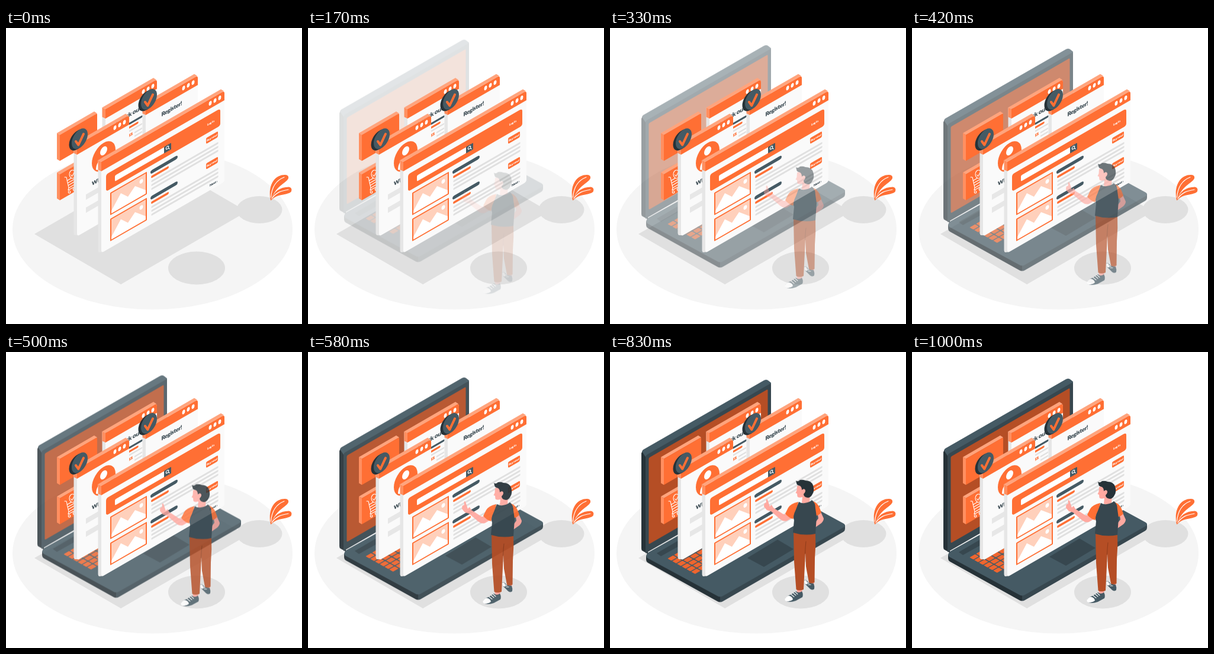
These frames come from a looping animation (500x500 px, 1040 ms). An HTML page without scripts:

```html
<!DOCTYPE html>
<html lang="en">
<head>
<meta charset="utf-8">
<title>Online shop</title>
<style>
html, body { margin: 0; width: 100%; height: 100%; overflow: hidden; background: #fff; }
svg { display: block; width: 100vw; height: 100vh; }
text { font-family: Lato, "Open Sans", sans-serif; font-weight: 900; letter-spacing: -.04em; fill: #37474f; }
.main { fill: #ff6f34; }
.light { fill: #ffa47d; }
.edge { fill: #ff8f60; }
.page { fill: #fafafa; }
.side { fill: #e6e6e6; }
.slate { fill: #455a64; }
.dark { fill: #37474f; }
.night { fill: #263238; }
.brown { fill: #b54e25; }
.skin { fill: #ffa9a0; }
.shade { fill: #e0e0e0; }
.white { fill: #fff; }
.line { fill: none; stroke-linecap: round; stroke-linejoin: round; }
.s-dark { stroke: #455a64; }
.s-main { stroke: #ff6f34; }
.s-grey { stroke: #e0e0e0; }
.s-white { stroke: #fff; }
.drop, .rise { animation: enter 1040ms infinite; }
.drop { --from: -30px; }
.rise { --from: 30px; }
@keyframes enter {
  0% { opacity: 0; transform: translateY(var(--from)); animation-timing-function: cubic-bezier(.345, .089, .5, 1.367); }
  92.3%, 100% { opacity: 1; transform: translateY(0); }
}
</style>
</head>
<body>
<svg viewBox="0 0 500 500">
  <defs>
    <g id="dots" class="white">
      <ellipse cx="-16" cy="7.3" rx="2.5" ry="3.6"/>
      <ellipse cx="-8" cy="7.3" rx="2.5" ry="3.6"/>
      <ellipse cy="7.3" rx="2.5" ry="3.6"/>
    </g>
    <g id="badge">
      <ellipse class="line" rx="13.5" ry="15.6" transform="matrix(1 -.577 0 1 -2 1.2)" style="fill:#263238"/>
      <ellipse class="night" rx="13.5" ry="15.6" transform="matrix(1 -.577 0 1 -4.5 2.5)"/>
      <ellipse class="slate" rx="13.5" ry="15.6" transform="matrix(1 -.577 0 1 0 0)"/>
      <path class="line s-main" stroke-width="4" d="M-6.5 4.5L-2.2 10.5L6.5 -8"/>
    </g>
    <g id="photo">
      <rect width="60" height="36" fill="#ffd0bb"/>
      <path class="white" d="M0 32L17 10L29 23L41 12L60 30V36H0z"/>
      <ellipse class="white" cx="51.5" cy="10" rx="3" ry="3.5"/>
      <rect class="line s-main" width="60" height="36" stroke-width="2"/>
    </g>
    <g id="entry" class="line">
      <path class="s-dark" stroke-width="6" d="M86 66h40"/>
      <path class="s-main" stroke-width="4" d="M86 74.5h26"/>
      <path class="s-grey" stroke-width="3.4" d="M86 82h110M86 88.5h110M86 95h110"/>
    </g>
    <g id="buy">
      <rect class="main" width="20" height="10" rx="2"/>
      <text x="10" y="6.8" font-size="4.6" text-anchor="middle" style="fill:#fff">Buy now!</text>
    </g>
    <g id="panel">
      <path class="light" d="M-5 -6H58L63 0H0z"/>
      <path class="edge" d="M0 0L-5 -6V38L0 44z"/>
      <path class="main" d="M0 0H61q2 0 2 2V42q0 2-2 2H0z"/>
    </g>
    <pattern id="keys" width="11" height="8" patternUnits="userSpaceOnUse">
      <rect width="9.4" height="6.6" rx="1" fill="#f0652e"/>
    </pattern>
  </defs>

  <ellipse cx="247.5" cy="340" rx="236.5" ry="135.5" fill="#f5f5f5"/>
  <g class="shade">
    <path d="M48 348L194 433L407 310L261 225z"/>
    <ellipse cx="322" cy="405.5" rx="48" ry="28"/>
    <ellipse cx="428" cy="307" rx="38.5" ry="23"/>
  </g>

  <!-- laptop -->
  <g class="drop">
    <path class="night" d="M61 342V349q0 3 3 5L181 419q2.500 1.500 5 1.500V400z"/>
    <path class="dark" d="M186 400V420.500q2.500 0 5-1.500L394 302q3-2 3-5V290z"/>
    <path class="slate" d="M64 337L272 221L395 288q4 3 0 6L191 410q-5 3-10 0L63 346q-4-4 1-9z"/>
    <path class="dark" d="M79 338L120 314V324L86 343z"/>
    <path class="dark" d="M232 346L283 315L310 331L260 361z"/>
    <rect width="148" height="47" fill="url(#keys)" transform="matrix(1 -.577 1 .56 97 347)"/>
    <path class="night" d="M53 169L56 163L64 172V339L55 334q-2-1-2-4z"/>
    <path class="slate" d="M54 166q1-2 3-3.500L260 46q4-2 7 0L272 50V56L61 177z"/>
    <g transform="matrix(1 -.577 0 1 60 173)">
      <path class="dark" d="M3 0H209q3 0 3 3V161q0 4-4 4H0V4q0-4 3-4z"/>
      <rect class="brown" x="5.500" y="7" width="201" height="146" rx="2"/>
    </g>
  </g>

  <!-- floating panels -->
  <use href="#panel" transform="matrix(1 -.577 0 1 91 180.500)"/>
  <use href="#panel" transform="matrix(1 -.577 0 1 91 247)"/>
  <g class="line s-white" stroke-width="1.1">
    <path d="M99 252L102 252L106 270L118 263M103 258L118 249M104 262L118 254M105 266L118 258M106 270L105 274L118 267"/>
    <ellipse cx="112.500" cy="247" rx="5.500" ry="7" style="fill:#ff6f34"/>
    <path d="M109.500 248L111.500 250.500L115.500 243.500"/>
    <ellipse cx="107" cy="277" rx="1.800" ry="2"/>
    <ellipse cx="115" cy="272.500" rx="1.800" ry="2"/>
  </g>

  <!-- check out -->
  <g transform="matrix(1 -.577 0 1 168 137)">
    <path class="side" d="M0 0L-5.500 -6V89L0 95z"/>
    <path class="edge" d="M0 0L-5.500 -6V10L0 16z"/>
    <path class="light" d="M-5.500 -6H81L86 0H0z"/>
    <rect class="page" width="87" height="95" rx="4"/>
    <path class="main" d="M0 0H83q4 0 4 4V16H0z"/>
    <use href="#dots" x="80"/>
    <text x="60" y="36" font-size="10" text-anchor="end">Check out</text>
    <g class="line" stroke-width="3.500">
      <path class="s-dark" d="M20 48H61"/>
      <path class="s-main" d="M20 54.500H54"/>
      <path class="s-grey" stroke-width="2.500" d="M20 60.500H61M50 68H61M50 74H61"/>
    </g>
    <text x="46" y="70" font-size="9" text-anchor="end" style="fill:#ff6f34">Address</text>
  </g>

  <!-- register -->
  <g transform="matrix(1 -.577 0 1 236 131)">
    <path class="side" d="M0 0L-5.500 -6V89L0 95z"/>
    <path class="edge" d="M0 0L-5.500 -6V10L0 16z"/>
    <path class="light" d="M-5.500 -6H82L87 0H0z"/>
    <rect class="page" width="88" height="95" rx="4"/>
    <path class="main" d="M0 0H84q4 0 4 4V16H0z"/>
    <use href="#dots" x="80"/>
    <text x="26.500" y="34" font-size="9.500">Register!</text>
  </g>
  <use href="#badge" x="241.500" y="120.500"/>

  <!-- welcome -->
  <g transform="matrix(1 -.577 0 1 120 198)">
    <path class="side" d="M2 2L-5.500 -6V145q0 3 2 5L3 154z"/>
    <path class="edge" d="M0 0L-5.500 -6V10L0 16z"/>
    <path class="light" d="M-5.500 -6H82L87 0H0z"/>
    <rect class="page" width="88" height="154" rx="4"/>
    <path class="main" d="M0 0H84q4 0 4 4V16H0z"/>
    <use href="#dots" x="80"/>
    <ellipse class="main" cx="45" cy="45" rx="20" ry="23"/>
    <ellipse class="white" cx="45" cy="35.500" rx="6" ry="7"/>
    <path class="white" d="M32 60q0-14 13-14t13 14q-13 9-26 0z"/>
    <text x="25" y="83" font-size="9">WELCOME</text>
    <path class="shade" d="M15 92H74V101H15zM15 114H74V123H15z" opacity=".75"/>
  </g>
  <use href="#badge" x="124.500" y="187"/>

  <!-- shop -->
  <g transform="matrix(1 -.577 0 1 161 226)">
    <path class="side" d="M2 2L-5.500 -6V146q0 3 2 5L3 154z"/>
    <path class="edge" d="M0 0L-5.500 -6V10L0 16z"/>
    <path class="light" d="M-5.500 -6H202L207 0H0z"/>
    <rect class="page" width="208" height="154" rx="4"/>
    <path class="main" d="M0 0H204q4 0 4 4V16H0z"/>
    <use href="#dots" x="200"/>
    <rect class="main" x="8" y="26" width="193" height="29" rx="4"/>
    <text x="179" y="42.500" font-size="4.800" style="fill:#fff">Log in</text>
    <rect class="white" x="23" y="36.500" width="84" height="10" rx="2"/>
    <rect class="slate" x="106" y="36" width="12" height="11" rx="1"/>
    <g class="line s-white" stroke-width="1.200">
      <circle cx="111.500" cy="40.500" r="2.200"/>
      <path d="M113.200 42.200L115 44.500"/>
    </g>
    <use href="#photo" x="16" y="62"/>
    <use href="#photo" x="16" y="106"/>
    <use href="#entry"/>
    <use href="#entry" y="43.500"/>
    <use href="#buy" x="177" y="62"/>
    <use href="#buy" x="177" y="105"/>
    <text x="183" y="147.500" font-size="5.200">Next ›</text>
  </g>

  <!-- leaves -->
  <g class="main">
    <path d="M447 291C442 268 452 248 471 248Q478 248 477 254C473 263 455 266 448 291z"/>
    <path d="M448 291C452 276 462 269 478 268.500Q484 270 482 276C477 283 458 279 448 291z"/>
  </g>
  <path class="line s-white" stroke-width="1.200" d="M447.500 286C449 267 457 257 470 252M449 288C457 277 465 275 477 273"/>

  <!-- shopper -->
  <g class="rise">
    <path class="skin" d="M350 270L356 272L361 283Q361 287 357 291L347 298L346 291L352 283z"/>
    <path class="main" d="M343 254Q351 257 354 265L357 273Q353 278 346 279z"/>
    <path class="skin" d="M336 390H344.500V397H337zM315.500 402H324.500V410H316z"/>
    <path class="slate" d="M328.500 387Q331 386 335 391L344 393Q346 398 345 402Q342 405 338 402L329 393z"/>
    <g transform="translate(0 1)">
      <path class="slate" d="M296 417Q300 412 305 411L314 405Q319 409 324 405Q327 410 325 415L314 421Q303 425 296 421z"/>
      <path class="white" d="M295.500 419Q295 416 301 412.500Q308 413 309 419Q303 424 296 421.500z"/>
      <path class="line s-white" stroke-width="1.100" d="M306 410.500L311 414.500M309.500 408L314 412M312.500 406L317 410"/>
    </g>
    <path class="white" d="M328 389Q329 386 332 388.500L334 394Q331 395 329 393z"/>
    <path class="line s-white" stroke-width="1.100" d="M333 391L336 393M335 395L339 395"/>
    <path class="brown" d="M310 306L347 307Q348 328 346 350L345.500 391Q340 394 336 391L331 364L330 340L329 362L327 403Q320 406 314.500 403L311 356z"/>
    <path d="M331 322Q330 330 329.500 342" class="line" stroke="#8f3c1b" stroke-width="1"/>
    <path class="skin" d="M307 274L297 276L293 276L276 265L273 260Q271 261 270 263L266 251Q264 249 263.500 252L264 256L260.500 258L260 263L265 269L272 271L287 284Q293 289 299 287L311 280z"/>
    <path class="main" d="M318 255Q305 258 301 265L296 275Q302 282 309 284L316 270z"/>
    <path class="skin" d="M316 228L315.500 236L313.500 240L316 241L316.500 246Q318 249 325 247L324 256Q330 261 337 256L338 240L330 225z"/>
    <path class="dark" d="M319 255Q324 258 329 257Q337 256 341 252Q347 256 347 266L349 280L347 309Q328 313 309 307L311 286Q308 280 314 268z"/>
    <path class="night" d="M314 219Q317 222 321 218Q326 217 330 219Q340 219 343 227Q346 236 342 242Q339 248 334 248Q327 247 327 242L330 237Q330 232 326 234L324 235Q324 230 321 228Q315 227 315 223z"/>
    <ellipse class="skin" cx="327" cy="237" rx="2.500" ry="3.500"/>
  </g>
</svg>
</body>
</html>
```
